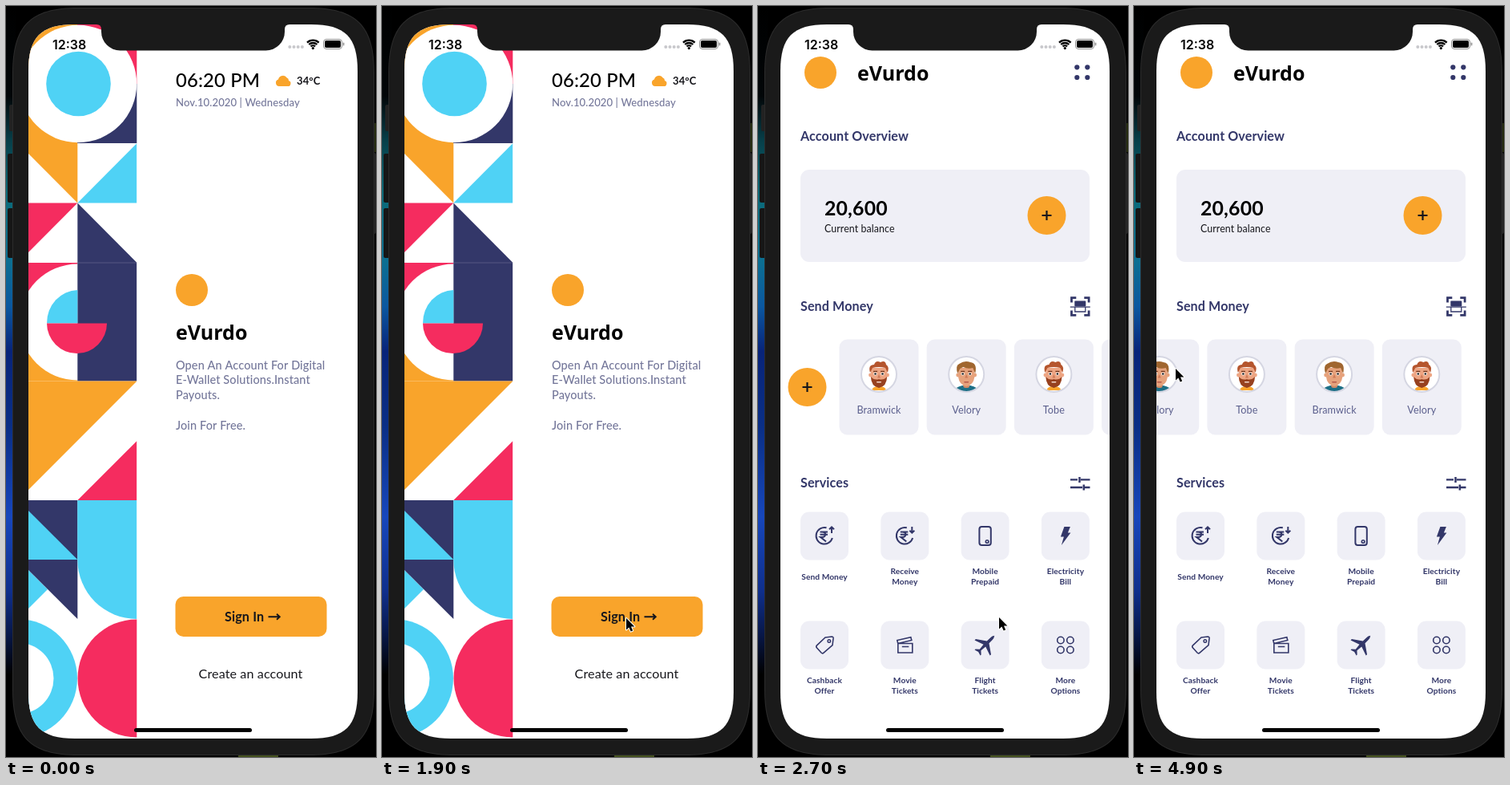
An HTML page with a canvas for the animation above (5000 ms loop, 462 by 936 pixels).

```html
<!DOCTYPE html>
<html lang="en">
<head>
<meta charset="utf-8">
<title>Wallet app</title>
<style>
html, body { margin: 0; width: 100%; height: 100%; overflow: hidden; background: #000; }
canvas { display: block; width: 462px; height: 936px; }
</style>
</head>
<body>
<canvas id="stage"></canvas>
<script>
const W = 462, H = 936, LOOP = 5000, STEP = 100;
const ORANGE = '#f9a42b', NAVY = '#333769', CYAN = '#4fd2f5', PINK = '#f52c5f';
const CARD = '#efeff6', MUTED = '#74779a', BODY = '#1a1a1a', INK = '#17171c';
const BRAND = 'eVurdo';
const PEOPLE = ['Bramwick', 'Velory', 'Tobe'];

const canvas = document.getElementById('stage');
const ctx = canvas.getContext('2d');
const ratio = window.devicePixelRatio || 1;
canvas.width = W * ratio;
canvas.height = H * ratio;

// Drawing helpers

function at(x, y, draw) {
  ctx.save();
  ctx.translate(x, y);
  draw();
  ctx.restore();
}

function disc(x, y, r, color, from = 0, to = Math.PI * 2) {
  ctx.fillStyle = color;
  ctx.beginPath();
  ctx.arc(x, y, r, from, to);
  ctx.fill();
}

function rect(x, y, w, h, color, r = 0) {
  ctx.fillStyle = color;
  ctx.beginPath();
  ctx.roundRect(x, y, w, h, r);
  ctx.fill();
}

// Rectangle with continuous-curvature corners reaching s along each side
function squircle(x, y, w, h, s) {
  const k = s * 0.27, r = x + w, b = y + h;
  const p = new Path2D();
  p.moveTo(x + s, y);
  p.lineTo(r - s, y);
  p.bezierCurveTo(r - k, y, r, y + k, r, y + s);
  p.lineTo(r, b - s);
  p.bezierCurveTo(r, b - k, r - k, b, r - s, b);
  p.lineTo(x + s, b);
  p.bezierCurveTo(x + k, b, x, b - k, x, b - s);
  p.lineTo(x, y + s);
  p.bezierCurveTo(x, y + k, x + k, y, x + s, y);
  return p;
}

const SCREEN = squircle(28, 23, 411, 890, 58);
const RIM = squircle(8, 2, 452, 932, 82);
const SHELL = squircle(9, 3, 450, 930, 81);

function shape(d, color) {
  ctx.fillStyle = color;
  ctx.fill(new Path2D(d));
}

function line(d, color = NAVY, width = 1.8) {
  ctx.strokeStyle = color;
  ctx.lineWidth = width;
  ctx.stroke(new Path2D(d));
}

function ring(x, y, r, color = NAVY, width = 1.6) {
  ctx.strokeStyle = color;
  ctx.lineWidth = width;
  ctx.beginPath();
  ctx.arc(x, y, r, 0, Math.PI * 2);
  ctx.stroke();
}

function text(str, x, y, size, color, weight = 400, align = 'left', family = 'Lato') {
  ctx.font = `${weight} ${size}px ${family}, sans-serif`;
  ctx.letterSpacing = family === 'Lato' ? `${size * 0.007}px` : '0px';
  ctx.textAlign = align;
  ctx.fillStyle = color;
  ctx.fillText(str, x, y);
}

function plusButton(x, y) {
  disc(x, y, 24, ORANGE);
  line(`M${x - 6} ${y}h12M${x} ${y - 6}v12`, INK, 2.2);
}

// Welcome page

function pattern() {
  ctx.save();
  ctx.beginPath();
  ctx.rect(28, 23, 135.3, 889);
  ctx.clip();

  rect(15, 23, 74, 148, ORANGE);
  rect(89, 23, 75, 74, PINK);
  rect(89, 97, 75, 74, NAVY);
  disc(90, 97, 73.2, '#fff');
  disc(90.5, 97, 40.3, CYAN);

  shape('M15 171H89.3V245.5Z', ORANGE);
  shape('M163.5 171V245.5H89.3Z', CYAN);
  shape('M15 245.5H89.3L15 320Z', PINK);
  shape('M89.3 245.5L163.5 320H89.3Z', NAVY);

  rect(15, 320, 74.3, 74, PINK);
  rect(15, 394, 74.3, 73.5, ORANGE);
  disc(89.3, 394, 72.5, '#fff');
  rect(89.3, 320, 74.2, 147.5, NAVY);
  rect(89.3, 319.7, 74.2, 0.6, '#777a9c');
  shape('M89.3 354V395.5H51A39 41 0 0 1 89.3 354Z', CYAN);
  disc(88.5, 395.5, 37.5, PINK, 0, Math.PI);

  shape('M15 467.5H163.5L15 616Z', ORANGE);
  shape('M163.5 542V616H89.3Z', PINK);

  rect(15, 616, 74.3, 74, CYAN);
  shape('M15 616H89.3V690Z', NAVY);
  shape('M15 690L52 727L15 764Z', CYAN);
  shape('M15 690H89.3V764Z', NAVY);
  shape('M89.3 616H163.5V764A74 74 0 0 1 89.3 690Z', CYAN);

  disc(15, 838, 74, CYAN);
  disc(15, 838, 44.5, '#fff');
  disc(163, 838, 73.5, PINK);
  ctx.restore();
}

function welcomePage() {
  rect(28, 23, 411, 890, '#fff');
  pattern();

  text('06:20 PM', 212, 101, 23.8, '#000', 500);
  shape('M341 100A4.3 4.3 0 0 1 340 91.6A6 6 0 0 1 350.8 89.5A3.6 3.6 0 0 1 353 93A3.6 3.6 0 0 1 351.5 100Z', ORANGE);
  text('34°C', 363, 97.5, 13, INK, 700);
  text('Nov.10.2020 | Wednesday', 212, 124.5, 13.1, MUTED, 500);

  disc(232, 354, 20, ORANGE);
  text(BRAND, 212, 416, 25, '#000', 700, 'left', 'Open Sans');
  ['Open An Account For Digital', 'E-Wallet Solutions.Instant', 'Payouts.', '', 'Join For Free.']
    .forEach((row, i) => text(row, 212, 452.5 + i * 18.9, 14.5, MUTED, 500));

  rect(211.5, 736, 189, 50, ORANGE, 10);
  text('Sign In', 273, 766.5, 16.2, INK, 700);
  line('M327.5 761.3H341M338 757.8L341.8 761.3L338 764.8', INK, 1.9);
  text('Create an account', 305.5, 838, 16.1, INK, 400, 'center');
}

// Home page

const COIN = 'M2.5 -10.2A10.3 10.3 0 1 0 9.8 2.5M-5.5 -5H4M-5.5 -1.8H4M-3 -5C2.5 -5 2.5 1.4 -3 1.4H-5L2 7';

const icons = {
  send: () => line(COIN + 'M9 -3.5V-11M6 -8.2L9 -11.2L12 -8.2', NAVY, 2),
  receive: () => line(COIN + 'M9 -11.5V-4M6 -6.8L9 -3.8L12 -6.8', NAVY, 2),
  phone() {
    ctx.strokeStyle = NAVY;
    ctx.lineWidth = 2;
    ctx.beginPath();
    ctx.roundRect(-7.2, -11.5, 14.4, 23, 3);
    ctx.stroke();
    ring(2.5, 7, 1.8);
  },
  bolt: () => shape('M-1.5 -11.5H6L3 -4H6.5L-5 11.5L-2 1H-6Z', NAVY),
  tag() {
    line('M1 -9.5L9 -10.5Q11.5 -10.5 11 -8L10 0L-1 9.7Q-2.5 11 -4 9.5L-9.5 3.5Q-11 1.8 -9.5 .3Z', NAVY, 1.6);
    ring(5.8, -5, 1.8, NAVY, 1.4);
  },
  movie: () => line('M-8.5 -2H9.5V9.5H-8.5ZM-8.5 -2L-9.5 -6L7.5 -9.8L8.5 -6L-8.5 -2M-3.5 2H5', NAVY, 1.6),
  plane() {
    ctx.rotate(Math.PI / 4);
    shape('M0 -16.5Q1.9 -14 1.9 -11V-5L13.5 3V5L1.9 1L1.2 8.5L5 12V13.5L0 12L-5 13.5V12L-1.2 8.5L-1.9 1L-13.5 5V3L-1.9 -5V-11Q-1.9 -14 0 -16.5Z', NAVY);
  },
  more() {
    for (const x of [-6, 6]) for (const y of [-6, 6]) ring(x, y, 4.2, NAVY, 1.6);
  }
};

const SERVICES = [
  ['send', 'Send Money'], ['receive', 'Receive', 'Money'],
  ['phone', 'Mobile', 'Prepaid'], ['bolt', 'Electricity', 'Bill'],
  ['tag', 'Cashback', 'Offer'], ['movie', 'Movie', 'Tickets'],
  ['plane', 'Flight', 'Tickets'], ['more', 'More', 'Options']
];

function avatar(bearded) {
  const hair = bearded ? '#b5552d' : '#a0662f';
  const skin = bearded ? '#eda583' : '#e6a27c';
  disc(0, 0, 22.5, '#fff');
  ctx.save();
  ctx.beginPath();
  ctx.arc(0, 0, 21.5, 0, Math.PI * 2);
  ctx.clip();
  if (bearded) {
    shape('M-9 20Q-8 15 0 15Q8 15 9 20Z', ORANGE);
  } else {
    shape('M-17 22Q-14 16 -5 14H5Q14 16 17 22Z', '#1d6f86');
    rect(-4, 9, 8, 8, '#d08a66', 3);
  }
  disc(-10.5, 1, 2.4, skin);
  disc(10.5, 1, 2.4, skin);
  shape('M-10 -8H10V4Q9 13 0 15Q-9 13 -10 4Z', skin);
  if (bearded) {
    shape('M-10 3Q-6 8 0 6Q6 8 10 3Q10 15 0 17Q-10 15 -10 3Z', '#97411f');
    rect(-3, 9, 6, 1.6, '#f3d9cc', 1);
    shape('M-11 -2Q-14 -12 -6 -12Q-4 -18 2 -15Q8 -18 9 -12Q13 -10 11 -2L8 -8Q0 -10 -8 -8Z', hair);
  } else {
    rect(-3, 9, 6, 1.5, '#b5594a', 1);
    shape('M-11 -1Q-14 -11 -9 -13Q-2 -18 5 -15Q14 -14 11 -1L8 -8Q2 -6 -4 -9L-8 -7Z', hair);
  }
  for (const x of [-4.5, 4.5]) {
    disc(x, -0.5, 2.1, '#fff');
    disc(x, -0.5, 1.3, '#222');
    rect(x - 2.5, -4.2, 5, 1.2, '#6f351c');
  }
  shape('M0 0L-2 4.5H2Z', '#cf7b58');
  ctx.restore();
  ring(0, 0, 22, '#d5d6e2', 2);
}

function contacts(scroll) {
  at(-scroll, 0, () => {
    plusButton(61.5, 475);
    for (let i = 0; i < 5; i++) {
      const x = 101.5 + i * 109.2;
      rect(x, 415.5, 99, 119, CARD, 10);
      at(x + 49.5, 459, () => avatar(i % 2 === 0));
      text(PEOPLE[i % 3], x + 49.5, 508, 12.6, '#5b5f8d', 400, 'center');
    }
  });
}

function services() {
  SERVICES.forEach(([icon, ...label], i) => {
    const x = 83 + (i % 4) * 100.3;
    const y = 660.5 + Math.floor(i / 4) * 136;
    rect(x - 30, y - 30, 60, 60, CARD, 11);
    at(x, y, icons[icon]);
    const top = label.length > 1 ? y + 47.5 : y + 54;
    label.forEach((row, n) => text(row, x, top + n * 13.3, 10.2, NAVY, 700, 'center'));
  });
}

function homePage(scroll) {
  rect(28, 23, 411, 890, '#fff');
  disc(78, 83, 20, ORANGE);
  text(BRAND, 124, 93, 25, '#000', 700, 'left', 'Open Sans');
  for (const x of [398.3, 411.3]) for (const y of [76.3, 89]) disc(x, y, 3.1, NAVY);

  text('Account Overview', 53, 168.3, 16.1, NAVY, 700);
  rect(53, 204, 361, 115, CARD, 11);
  text('20,600', 83, 261, 24.8, '#000', 700);
  text('Current balance', 83, 282, 12.4, INK);
  plusButton(360.5, 261);

  text('Send Money', 53, 380, 16.1, NAVY, 700);
  at(402.3, 374.5, () => {
    line('M-10.8 -5V-10.8H-5M5 -10.8H10.8V-5M10.8 5V10.8H5M-5 10.8H-10.8V5', NAVY, 2.8);
    rect(-7, -7, 14, 7, NAVY, 1);
    line('M-12.5 .7H12.5M-6.5 1V6.5H6.5V1', NAVY, 1.3);
  });
  contacts(scroll);

  text('Services', 53, 600, 16.1, NAVY, 700);
  line('M390 590.3H399M403 590.3H414.5M390 600H405M408 600H414.5', NAVY, 2.3);
  line('M401.5 587V594M406.8 596.5V603.5', NAVY, 2.5);
  services();
}

// Phone and desktop

function backdrop() {
  rect(0, 0, W, H, '#000');
  const glow = ctx.createLinearGradient(0, 0, 0, H);
  [[0, '#000'], [0.12, '#020608'], [0.18, '#07404a'], [0.25, '#0b6a78'], [0.34, '#0c6f92'],
   [0.4, '#0b58a0'], [0.46, '#08247a'], [0.56, '#0a2f86'], [0.68, '#1747bc'], [0.78, '#0f2f8c'],
   [0.84, '#071645'], [0.89, '#000']]
    .forEach(([p, c]) => glow.addColorStop(p, c));
  rect(0, 0, 12, H, glow);
  rect(457, 146, 5, 36, '#22290c');
  rect(290, 930, 50, 6, '#43501d');
}

function phoneBody() {
  rect(4, 123, 8, 33, '#222', 2);
  rect(2, 184, 8, 61, '#161616', 2);
  rect(2, 252, 8, 62, '#161616', 2);
  rect(456, 183, 6, 101, '#222', 2);
  ctx.fillStyle = '#2c2c2c';
  ctx.fill(RIM);
  ctx.fillStyle = BODY;
  ctx.fill(SHELL);
}

function statusBar() {
  shape('M113 22V23Q119 23 119 29V32A23.5 23.5 0 0 0 142.5 55.5H324.5A23.5 23.5 0 0 0 348 32V29Q348 23 354 23V22Z', BODY);
  text('12:38', 58, 53.5, 16, '#000', 600, 'left', 'Inter');
  for (let i = 0; i < 4; i++) disc(354.3 + i * 5.2, 51, 2, '#c8c8cc');
  const up = -Math.PI / 2, spread = 0.76;
  disc(383.3, 52.6, 1.6, '#000');
  ctx.strokeStyle = '#000';
  ctx.lineWidth = 2.3;
  for (const r of [4, 7.3, 10.6]) {
    ctx.beginPath();
    ctx.arc(383.3, 53.3, r, up - spread, up + spread);
    ctx.stroke();
  }
  ctx.strokeStyle = '#8c8c8c';
  ctx.lineWidth = 1;
  ctx.beginPath();
  ctx.roundRect(396.5, 41.5, 23, 12, 3.5);
  ctx.stroke();
  rect(398, 43, 20, 9, '#000', 2);
  rect(420.8, 45.5, 1.5, 4, '#8c8c8c', 1);
}

function pointer([x, y]) {
  at(x, y, () => {
    const d = 'M0 0V14.5L3.4 11.4L5.7 16.6L8.2 15.5L6 10.4H10.4Z';
    ctx.lineJoin = 'round';
    line(d, '#fff', 2);
    shape(d, '#000');
  });
}

// Motion

const clamp = (v, lo, hi) => Math.min(hi, Math.max(lo, v));

function bezier(p, x1, y1, x2, y2) {
  if (p <= 0 || p >= 1) return clamp(p, 0, 1);
  const curve = (s, a, b) => 3 * (1 - s) ** 2 * s * a + 3 * (1 - s) * s * s * b + s ** 3;
  let lo = 0, hi = 1;
  for (let i = 0; i < 24; i++) {
    const mid = (lo + hi) / 2;
    if (curve(mid, x1, x2) < p) lo = mid; else hi = mid;
  }
  return curve(lo, y1, y2);
}

const PUSH = { start: 1956, length: 400, parallax: 131 };
const DRAG = { from: 4400, grip: 298, max: 228.5 };
const PATH = [
  [500, 470, 690], [800, 349, 737], [1200, 305, 763], [1900, 305, 763], [2300, 301, 762],
  [2700, 301, 762], [3300, 369, 147], [3500, 369, 147], [4200, 315, 437],
  [4400, 299, 452], [4800, 52, 452], [5000, 52, 452]
];

function pointerAt(t) {
  const i = PATH.findIndex(k => k[0] > t);
  if (i < 1) return null;
  const [t0, x0, y0] = PATH[i - 1], [t1, x1, y1] = PATH[i];
  const p = (t - t0) / (t1 - t0);
  const e = p * p * (3 - 2 * p);
  return [x0 + (x1 - x0) * e, y0 + (y1 - y0) * e];
}

function draw(t) {
  ctx.setTransform(ratio, 0, 0, ratio, 0, 0);
  const push = bezier((t - PUSH.start) / PUSH.length, 0.35, 0.91, 0.33, 0.97);
  const hand = pointerAt(t);
  const scroll = t > DRAG.from ? clamp(DRAG.grip - hand[0], 0, DRAG.max) : 0;

  backdrop();
  phoneBody();

  ctx.save();
  ctx.clip(SCREEN);
  if (push < 1) at(-PUSH.parallax * push, 0, welcomePage);
  if (push > 0) {
    at(411 * (1 - push), 0, () => {
      const shade = ctx.createLinearGradient(8, 0, 28, 0);
      shade.addColorStop(0, 'rgba(0,0,0,0)');
      shade.addColorStop(1, 'rgba(0,0,0,.18)');
      rect(8, 23, 20, 890, shade);
      homePage(scroll);
    });
  }
  ctx.restore();

  statusBar();
  rect(160, 900, 147, 5, '#000', 2.5);
  if (hand) pointer(hand);
}

let origin = null;
function tick(now) {
  if (origin === null) origin = now;
  const t = (now - origin) % LOOP;
  draw(Math.floor(t / STEP) * STEP);
  requestAnimationFrame(tick);
}
requestAnimationFrame(tick);
</script>
</body>
</html>
```
